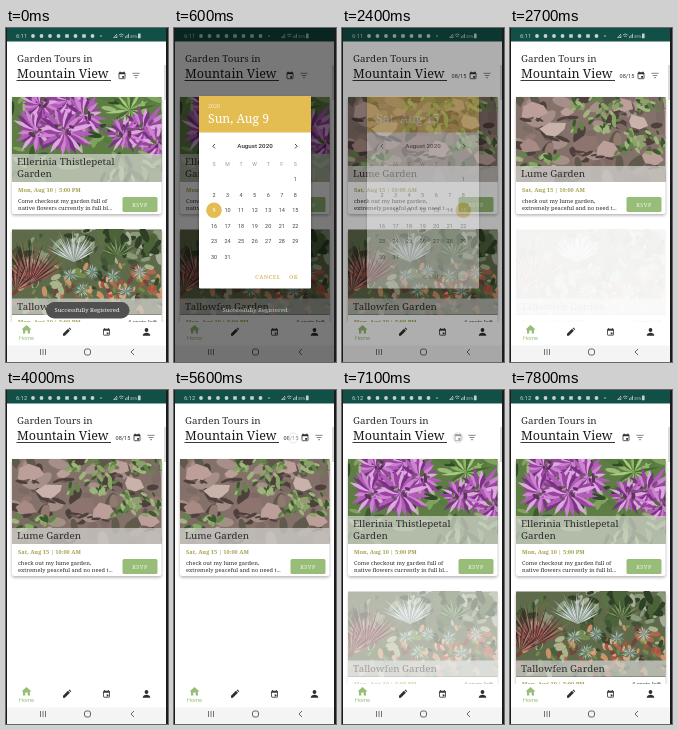
These frames come from a looping animation (162 px wide and 334 px high, 8 s). An HTML page:

```html
<!DOCTYPE html>
<html lang="en">
<head>
<meta charset="utf-8">
<title>Garden tours</title>
<style>
html, body { margin: 0; width: 100%; height: 100%; overflow: hidden; background: #fff; }
svg { display: block; width: 162px; height: 334px; }
</style>
</head>
<body>
<svg id="stage" viewBox="0 0 162 334" xmlns="http://www.w3.org/2000/svg">
  <defs>
    <clipPath id="top"><rect x="6" y="69" width="149.5" height="85"/></clipPath>
    <clipPath id="low"><rect x="6" y="201" width="149.5" height="86"/></clipPath>
    <filter id="soft" x="-5%" y="-5%" width="110%" height="110%"><feGaussianBlur stdDeviation=".6"/></filter>
    <filter id="shade" x="-10%" y="-10%" width="120%" height="125%"><feGaussianBlur stdDeviation="1.6"/></filter>
  </defs>
</svg>
<script>
const LOOP = 8000;
const SERIF = '"Noto Serif", serif', SANS = 'Roboto, sans-serif';
const GREEN = '#98bd79', GOLD = '#e3bc52', INK = '#2e2e2e', PALE = '#c3d5d0';
const stage = document.getElementById('stage');

function add(parent, tag, attrs = {}, text) {
  const el = document.createElementNS('http://www.w3.org/2000/svg', tag);
  for (const k in attrs) el.setAttribute(k, attrs[k]);
  if (text !== undefined) el.textContent = text;
  parent.appendChild(el);
  return el;
}
const group = (parent, attrs) => add(parent, 'g', attrs);
const rect = (p, x, y, width, height, fill, more) => add(p, 'rect', { x, y, width, height, fill, ...more });
const dot = (p, cx, cy, r, fill, more) => add(p, 'circle', { cx, cy, r, fill, ...more });
const line = (p, d, stroke = INK, w = .9) =>
  add(p, 'path', { d, stroke, 'stroke-width': w, fill: 'none' });
const label = (p, x, y, size, text, fill = INK, more) =>
  add(p, 'text', { x, y, 'font-size': size, 'font-family': SERIF, fill, ...more }, text);
const sans = { 'font-family': SANS };
const mid = { ...sans, 'text-anchor': 'middle' };

// Opacity over time; steps are [ms, value].
function fade(el, ...steps) {
  const last = steps[steps.length - 1][1];
  const frames = [[0, steps[0][1]], ...steps, [LOOP, last]]
    .map(([t, opacity]) => ({ offset: t / LOOP, opacity }));
  el.animate(frames, { duration: LOOP, iterations: Infinity });
}
function show(el, from, to) {
  fade(el, [from, 0], [from, 1], [to, 1], [to, 0]);
}
function hide(el, from, to) {
  fade(el, [from, 1], [from, 0], [to, 0], [to, 1]);
}

let seed = 7;
function rnd() {
  seed = (seed * 16807) % 2147483647;
  return seed / 2147483647;
}

// Scatter n ellipses of the given colours over a box.
function scatter(p, n, colors, x, y, w, h, rx, ry, tilt = 180) {
  for (let i = 0; i < n; i++) {
    const cx = x + rnd() * w, cy = y + rnd() * h, k = .6 + rnd() * .7;
    add(p, 'ellipse', {
      cx, cy, rx: rx * k, ry: ry * k, fill: colors[i % colors.length],
      transform: `rotate(${(rnd() - .5) * tilt} ${cx} ${cy})`
    });
  }
}
// A burst of thin leaves or petals.
function burst(p, cx, cy, n, len, wide, colors, from = 0, sweep = 360) {
  for (let i = 0; i < n; i++) {
    const a = from + sweep * (i + rnd() * .6) / n, l = len * (.7 + rnd() * .4);
    add(p, 'path', {
      d: `M0 0Q${l * .5} ${-wide} ${l} 0Q${l * .5} ${wide} 0 0`, fill: colors[i % colors.length],
      transform: `translate(${cx} ${cy}) rotate(${a})`
    });
  }
}

function photo(p, y, clip, base) {
  const g = group(p, { 'clip-path': `url(#${clip})` });
  rect(g, 6, y, 150, 87, base);
  return group(g, { filter: 'url(#soft)' });
}
function paintFlowers(g) {
  scatter(g, 90, ['#3d5c2e', '#7fa25c', '#557b3e', '#9dbb78', '#2f4a28'], 6, 69, 150, 85, 8, 2.4);
  burst(g, 124, 82, 22, 24, 3, ['#8fb568', '#48692f', '#a9c882', '#5f8744']);
  const lilac = ['#b25cba', '#cd83d0', '#98439f', '#dca8df', '#7b3285'];
  const heads = [[62, 72, 29], [34, 76, 24], [78, 88, 24], [30, 102, 25], [58, 104, 29], [138, 101, 27], [152, 116, 24], [118, 106, 20]];
  for (const [x, y, r] of heads) {
    burst(g, x, y, 24, r, r * .17, lilac);
    scatter(g, 10, ['#5d3159', '#7d4c7a', '#c884cb', '#54683e'], x - 8, y - 7, 16, 12, 3, 1.5);
  }
  scatter(g, 10, ['#567a3d', '#8cab65'], 6, 122, 150, 30, 10, 2.5, 70);
}
function paintDesert(g) {
  scatter(g, 60, ['#2f4228', '#5b7246', '#89997a', '#3f5535', '#a5ae96'], 6, 201, 150, 34, 6, 2.6);
  burst(g, 68, 234, 24, 32, 1.6, ['#c2cdc9', '#90a39f', '#dce1dc'], 205, 130);
  scatter(g, 16, ['#2d4026', '#4c6239'], 96, 203, 58, 26, 9, 4);
  burst(g, 112, 228, 16, 20, 1.6, ['#3f5832', '#809763'], 190, 160);
  scatter(g, 130, ['#758b4e', '#b0654c', '#48613a', '#c99267', '#74453c', '#a9b48d', '#34482e'],
    6, 234, 150, 52, 4.4, 2.2);
  const red = ['#663139', '#95534f', '#42282b', '#ad7767'];
  burst(g, 24, 256, 30, 44, 1.5, red, 205, 135);
  burst(g, 10, 262, 14, 32, 1.4, red, 240, 110);
  for (const [x, y] of [[64, 247], [86, 244], [107, 248], [134, 244], [76, 262], [120, 263]])
    burst(g, x, y, 20, 9, 1.2, ['#9db0a4', '#627f74', '#c0ccbe']);
  scatter(g, 40, ['#b4503f', '#dc9264', '#6d8b4b', '#d7a68b'], 70, 249, 86, 21, 3, 1.5);
}
function paintRocks(g) {
  scatter(g, 80, ['#7d6a64', '#a58f88', '#4e413d', '#927a71', '#5f5a4c'], 6, 69, 150, 85, 9, 4.5);
  const stone = ['#bd9f99', '#a78a84', '#8e746f', '#c9b2aa'];
  for (const [x, y, r] of [[24, 82, 16], [44, 101, 16], [75, 117, 17], [97, 121, 15], [128, 95, 14], [142, 130, 14], [20, 118, 13], [112, 78, 13], [57, 84, 10]]) {
    const d = [0, 1, 2, 3, 4, 5].map(i => {
      const a = i * Math.PI / 3 + rnd() * .5, q = r * (.6 + rnd() * .4);
      return `${x + q * Math.cos(a)} ${y + q * .72 * Math.sin(a)}`;
    }).join('L');
    add(g, 'path', { d: `M${d}Z`, fill: stone[Math.floor(rnd() * 4)] });
    scatter(g, 3, ['#4e413d', '#6d5b55'], x - r * .6, y + r * .5, r * 1.2, 3, 6, 1.6, 50);
  }
  const leaf = ['#638348', '#88a566', '#3c5a2d', '#a0b47d'];
  scatter(g, 50, leaf, 62, 70, 48, 34, 4, 1.8);
  scatter(g, 40, leaf, 104, 104, 50, 22, 4, 1.8);
  scatter(g, 20, leaf, 6, 126, 46, 14, 4, 1.8);
  scatter(g, 18, leaf, 128, 69, 28, 14, 4, 1.8);
}

function card(p, y, clip, paint, base, titles, band, date, lines) {
  rect(p, 6, y + 1.5, 149.5, 117, '#000', { opacity: .3, filter: 'url(#shade)', rx: 2 });
  rect(p, 6, y, 149.5, 117, '#fff', { rx: 2 });
  paint(photo(p, y, clip, base));
  const end = y + 85;
  rect(p, 6, end - band, 149.5, band, '#d3d4d0', { opacity: .72 });
  titles.forEach((t, i) => label(p, 11, end - 5 - 12 * (titles.length - 1 - i), 9.8, t));
  label(p, 12, y + 94.5, 5.7, date, '#a3a24f', { 'font-weight': 700 });
  lines.forEach((t, i) => label(p, 12, y + 105.5 + 7.6 * i, 5.7, t));
  rect(p, 116.5, y + 100, 35, 15, GREEN, { rx: 1.5 });
  label(p, 134, y + 109.5, 5.4, 'RSVP', '#f2f7ee', { 'text-anchor': 'middle', 'letter-spacing': .6 });
}

function calendarIcon(p, x, y) {
  rect(p, x - 3, y - 2.8, 6, 6, 'none', { stroke: INK, 'stroke-width': .8, rx: .5 });
  rect(p, x - 3, y - 2.8, 6, 1.5, INK);
  line(p, `M${x - 1.9} ${y - 4}v2M${x + 1.9} ${y - 4}v2`, INK, .8);
  rect(p, x + .2, y + .5, 1.8, 1.8, INK);
}
function filterIcon(p, x, y) {
  line(p, `M${x - 3.6} ${y - 2.2}h7.2M${x - 2.3} ${y}h4.6M${x - 1} ${y + 2.2}h2`, '#666', .8);
}

// Page
rect(stage, 0, 0, 162, 334, '#fff');
const all = group(stage), more = group(stage), picked = group(stage);
card(all, 69, 'top', paintFlowers, '#5d7d45', ['Ellerinia Thistlepetal', 'Garden'], 28,
  'Mon, Aug 10 | 5:00 PM', ['Come checkout my garden full of', 'native flowers currently in full bl...']);
card(more, 201.5, 'low', paintDesert, '#5f6a4a', ['Tallowfen Garden'], 16,
  'Mon, Aug 10 | 5:00 PM', []);
label(more, 151, 296.3, 5.7, '4 spots left', INK, { 'text-anchor': 'end' });
card(picked, 69, 'top', paintRocks, '#84716a', ['Lume Garden'], 16,
  'Sat, Aug 15 | 10:00 AM', ['check out my lume garden,', 'extremely peaceful and no need t...']);

label(stage, 11, 34, 9.8, 'Garden Tours in');
label(stage, 11, 50, 12.5, 'Mountain View', '#1c1c1c');
line(stage, 'M10.5 52.5H105', '#222', .9);
const plain = group(stage), dated = group(stage);
calendarIcon(plain, 116, 47.5);
filterIcon(plain, 130, 47.5);
label(dated, 109.5, 49.5, 5.6, '08/15', '#333', sans);
calendarIcon(dated, 131, 47.5);
filterIcon(dated, 145, 47.5);
rect(stage, 158.3, 37, 1.4, 35, '#aaa', { opacity: .6 });

// Tab bar
rect(stage, 0, 294, 162, 24, '#fff');
add(stage, 'path', { d: 'M15.5 301.5L20.5 297l5 4.5h-1.5v4h-2.3v-3h-2.4v3H17v-4z', fill: GREEN });
label(stage, 20.5, 312, 5.6, 'Home', GREEN, mid);
add(stage, 'path', { d: 'M57 307.7v-1.9l5-5 1.9 1.9-5 5zM62.6 300.2l.8-.8 1.9 1.9-.8.8z', fill: INK });
calendarIcon(stage, 100.5, 304);
dot(stage, 140.5, 302, 1.9, INK);
add(stage, 'path', { d: 'M136.7 307.7c0-4 7.6-4 7.6 0z', fill: INK });

// System bar
rect(stage, 0, 317.5, 162, 16.5, '#f4f4f4');
line(stage, 'M34.5 321v6M37 321v6M39.5 321v6', '#555', .8);
rect(stage, 78.5, 321, 6, 6, 'none', { stroke: '#555', 'stroke-width': .9, rx: 2 });
line(stage, 'M128 321l-3 3 3 3', '#555', .9);

// Status bar
rect(stage, 0, 0, 162, 13.5, '#124f46');
const early = label(stage, 10, 10, 5.8, '6:11', PALE, sans);
const late = label(stage, 10, 10, 5.8, '6:12', PALE, sans);
for (let i = 0; i < 9; i++) {
  const x = 27 + i * 8.5;
  if (i === 4 || i === 6) rect(stage, x - 1.8, 6.2, 3.6, 3.6, PALE, { rx: .5 });
  else dot(stage, x, 8, i < 8 ? 1.9 : .8, PALE);
}
line(stage, 'M107.5 10l3.4-4M108 9.4h3v-2', PALE, .8);
line(stage, 'M113 7q2.3-2 4.6 0M114.2 8.6q1.2-1 2.4 0', PALE, .8);
line(stage, 'M119.5 10v-1.6M121 10v-3M122.5 10v-4.2', PALE, .8);
label(stage, 124, 10, 4, '35%', PALE, sans);
rect(stage, 132, 5.6, 2.6, 4.6, PALE, { rx: .5 });

const scrim = rect(stage, 0, 0, 162, 334, '#000');

// Toast
const pill = rect(stage, 40, 274, 83.5, 16.5, '#505050', { rx: 8.2 });
const note = label(stage, 81, 284.2, 5.9, 'Successfully Registered', '#f2f2f2', { 'text-anchor': 'middle' });

// Date dialog
const dialog = group(stage);
rect(dialog, 25, 70, 112, 191, '#000', { opacity: .4, filter: 'url(#shade)' });
rect(dialog, 25, 68, 112, 192.5, '#fff', { rx: 1 });
rect(dialog, 25, 68, 112, 36.5, GOLD);
label(dialog, 34, 80, 5.4, '2020', '#fff', { opacity: .75 });
const before = group(dialog), after = group(dialog);
label(before, 34, 95, 12.2, 'Sun, Aug 9', '#fff');
label(after, 34, 95, 12.2, 'Sat, Aug 15', '#fff');
label(dialog, 81, 120.3, 6.2, 'August 2020', INK, { ...mid, 'font-weight': 500 });
line(dialog, 'M41 116l-2.2 2.2 2.2 2.2M121 116l2.2 2.2-2.2 2.2', '#333', .9);
const colX = i => 40 + i * 13.55, rowY = i => 151 + i * 15.6;
[...'SMTWTFS'].forEach((c, i) => label(dialog, colX(i), 137.5, 5.2, c, '#999', mid));
dot(before, colX(0), rowY(2), 7.8, GOLD);
dot(after, colX(6), rowY(2), 7.8, GOLD);
for (let d = 1; d <= 31; d++) {
  const cell = d + 5, x = colX(cell % 7), y = rowY(Math.floor(cell / 7)) + 2;
  const put = (p, c) => label(p, x, y, 5.5, d, c, mid);
  if (d === 9) { put(before, '#fff'); put(after, '#e3cf96'); }
  else if (d === 15) { put(before, '#444'); put(after, '#fff'); }
  else put(dialog, '#444');
}
const action = { 'font-weight': 700, 'letter-spacing': .4 };
label(dialog, 81, 250.5, 5.6, 'CANCEL', '#d9bd6c', action);
label(dialog, 115, 250.5, 5.6, 'OK', '#d9bd6c', action);

// Finger marks: x, y, down, up
function touch(x, y, down, up) {
  const g = group(stage);
  dot(g, x, y, 5, '#fff', { opacity: .5 });
  dot(g, x, y, 5, 'none', { stroke: '#aaa', 'stroke-width': .6, opacity: .5 });
  fade(g, [down, 0], [down + 60, 1], [up - 200, 1], [up, 0]);
}
[[116, 47.5, 100, 500], [121, 182, 1150, 1600], [121, 248, 2000, 2500],
 [119, 48, 5520, 6100], [116, 47.5, 6600, 7750]].forEach(t => touch(...t));

// Screen edges
rect(stage, 0, 0, 1, 334, '#1c1c1c');
rect(stage, 160, 0, 2, 334, '#1c1c1c');

hide(all, 2400, 6800);
fade(more, [2400, 1], [2700, .07], [2850, 0], [6850, 0], [7400, 1]);
show(picked, 2400, 6800);
hide(plain, 2400, 6700);
show(dated, 2400, 6700);
hide(early, 2900, LOOP);
show(late, 2900, LOOP);
fade(scrim, [250, 0], [480, .53], [2300, .53], [2550, 0]);
fade(dialog, [300, 0], [480, 1], [2280, 1], [2480, 0]);
hide(before, 1300, LOOP);
show(after, 1300, LOOP);
fade(pill, [200, 1], [560, 0]);
fade(note, [300, 1], [600, .7], [950, 0]);
</script>
</body>
</html>
```
